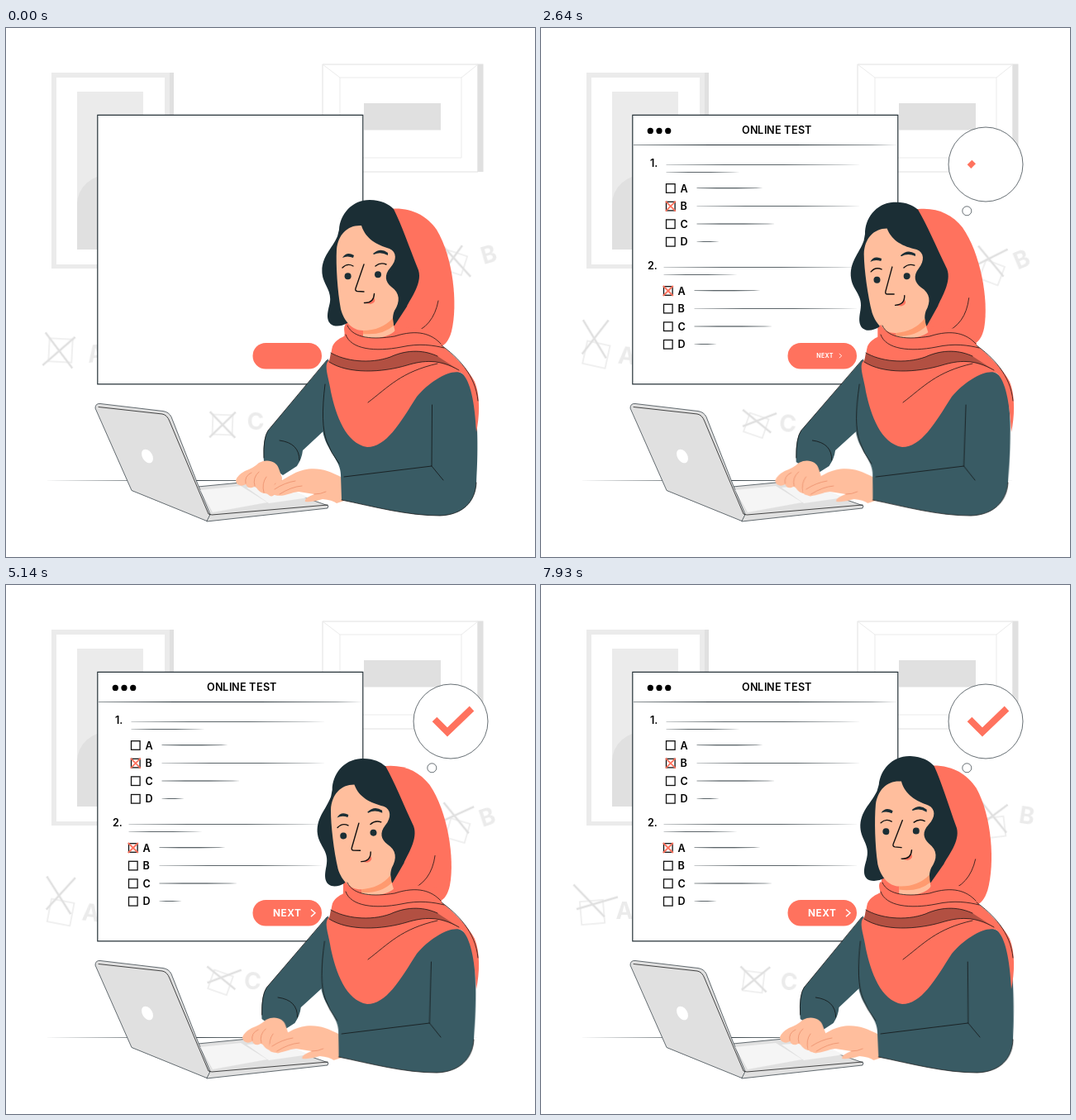
An HTML page that plays this animation: 640x640 px, repeating every 8000 ms.

```html
<!DOCTYPE html>
<html lang="en">
<head>
<meta charset="utf-8">
<title>Online test</title>
<style>
  @property --sway { syntax: '<angle>'; inherits: true; initial-value: 0deg; }

  html, body { margin: 0; width: 100%; height: 100%; overflow: hidden; background: #fff; }
  svg { display: block; width: 100vw; height: 100vh; animation: sway 8s infinite; }
  text, #title { font-family: Inter, "Open Sans", sans-serif; font-weight: 600; font-size: 12.6px; }
  #title { text-align: center; line-height: 18px; letter-spacing: .15px; color: #000; }
  #title span { display: inline-block; }
  #title .gap { margin-left: 3.6px; }
  .pop, .rule, .mark { transform-box: fill-box; transform-origin: center; }
  .rule { transform-origin: left; fill: #263238; }
  .ink { fill: none; stroke: #111; stroke-width: .75; stroke-linecap: round; stroke-linejoin: round; }
  .bold { stroke-width: 1.4; }
  .box { fill: #fff; stroke: #111; stroke-width: 1.3; }
  .mark { fill: none; stroke: #ff725e; stroke-width: 1.8; }
  .skin { fill: #ffbe9d; }
  .crease { fill: none; stroke: #eb8f6b; stroke-width: .8; stroke-linecap: round; }
  .coral { fill: #ff725e; }
  .cloth { fill: #395b64; }
  .hair { fill: #1b2e35; }
  .ghost { fill: none; stroke: #ebebeb; stroke-width: 1.6; }
  .cross { fill: none; stroke: #e0e0e0; stroke-width: 2.3; }
  .label { fill: #ebebeb; font-weight: 700; font-size: 28px; text-anchor: middle; }

  #head { transform-origin: 473px 405px; transform: rotate(var(--sway)); }
  .body { transform-origin: 0 405px; transform: skewX(calc(var(--sway) * .4)); }
  #hand { animation: reach 8s infinite; }
  .drift { animation: drift 8s infinite; }
  #bubble { animation: swell 8s infinite; }
  #dot { animation: dot 8s infinite; }
  #check { stroke-dasharray: 64; animation: tick 8s infinite; }

  @keyframes sway {
    0% { --sway: 0deg; animation-timing-function: cubic-bezier(.3, .3, .6, .95); }
    43% { --sway: -4.4deg; animation-timing-function: cubic-bezier(.4, 0, .7, .8); }
    100% { --sway: 2.1deg; }
  }
  @keyframes reach {
    0% { transform: none; animation-timing-function: ease-in-out; }
    45%, 75% { transform: translateX(11px); }
    100% { transform: translateX(9px); }
  }
  @keyframes drift {
    0% { transform: var(--a); animation-timing-function: cubic-bezier(.3, .3, .6, .95); }
    47% { transform: var(--b); animation-timing-function: cubic-bezier(.4, 0, .7, .8); }
    100% { transform: var(--c); }
  }
  @keyframes swell {
    0%, 8.2% { r: 0; opacity: 0; }
    8.25% { r: 0; opacity: 1; animation-timing-function: cubic-bezier(.2, .6, .5, 1); }
    32.5%, 100% { r: 45px; }
  }
  @keyframes dot {
    0%, 7% { r: 0; opacity: 0; }
    7.05% { r: 0; opacity: 1; animation-timing-function: ease-out; }
    15%, 100% { r: 5.5px; }
  }
  @keyframes tick {
    0%, 31% { stroke-dashoffset: 64; animation-timing-function: ease-in-out; }
    40%, 100% { stroke-dashoffset: 0; }
  }
</style>
</head>
<body>
<svg viewBox="0 0 640 640">
  <!-- wall pictures -->
  <path fill="#e0e0e0" d="M197 54h6v237h-6z"/>
  <path fill="#ebebeb" d="M55 54h143v237H55z"/>
  <path fill="#fff" d="M61 60h131v226H61z"/>
  <path fill="#ebebeb" d="M86 77h80v191H86z"/>
  <path fill="#e0e0e0" d="M86 268v-55a40 36 0 0 1 80 0v55z"/>
  <path fill="#fff" stroke="#e0e0e0" d="M383 44h188v130H383z"/>
  <path fill="#e0e0e0" d="M570.500 43.500h7v130.500h-7zM433 91h93v32.500h-93z"/>
  <path fill="none" stroke="#ebebeb" d="M404 60h147v97H404zM383 44l21 16M571 44l-20 16"/>
  <path class="rule" d="M45 547.500l180-.4 353 .4-200 .6z"/>

  <!-- floating answers -->
  <g transform="translate(66 390)">
    <path class="ghost drift" d="M-14-14h28v28h-28z" style="--a:translate(0,0) rotate(3deg);--b:translate(1px,6px) rotate(14deg);--c:translate(-4px,6px) rotate(-5deg)"/>
    <path class="cross drift" d="M-27 0h54" style="--a:translate(-2px,0) rotate(53deg);--b:translate(-1px,-16px) rotate(60deg);--c:translate(-8px,-8px) rotate(46deg)"/>
    <path class="cross drift" d="M-26 0h52" style="--a:translate(-2px,1px) rotate(-41deg);--b:translate(0,-19px) rotate(-54deg);--c:translate(2px,-5px) rotate(-16deg)"/>
    <g class="drift" style="--a:translate(43px,4px) rotate(-6deg);--b:translate(37px,7px) rotate(7deg);--c:translate(35px,4px) rotate(0deg)"><text class="label" y="10">A</text></g>
  </g>
  <g transform="translate(543 284)">
    <path class="ghost drift" d="M-12-12h24v24h-24z" style="--a:translate(0,0) rotate(18deg);--b:translate(3px,14px) rotate(21deg);--c:translate(6px,9px) rotate(-7deg)"/>
    <path class="cross drift" d="M-24 0h48" style="--a:translate(3px,-1px) rotate(48deg);--b:translate(1px,-2px) rotate(51deg);--c:translate(5px,-3px) rotate(51deg)"/>
    <path class="cross drift" d="M-22 0h44" style="--a:translate(-4px,-3px) rotate(-54deg);--b:translate(3px,-7px) rotate(-22deg);--c:translate(4px,-5px) rotate(-37deg)"/>
    <g class="drift" style="--a:translate(41px,-10px) rotate(-16deg);--b:translate(38px,-3px) rotate(-24deg);--c:translate(45px,-5px) rotate(9deg)"><text class="label" y="10">B</text></g>
  </g>
  <g transform="translate(262 480)">
    <path class="ghost drift" d="M-12-12h24v24h-24z" style="--a:translate(0,0) rotate(2deg);--b:translate(-2px,1px) rotate(22deg);--c:translate(-5px,0) rotate(7deg)"/>
    <path class="cross drift" d="M-22 0h44" style="--a:translate(0,0) rotate(46deg);--b:translate(-1px,-5px) rotate(38deg);--c:translate(-5px,-3px) rotate(45deg)"/>
    <path class="cross drift" d="M-22 0h44" style="--a:translate(0,0) rotate(-44deg);--b:translate(3px,-7px) rotate(-17deg);--c:translate(-2px,-4px) rotate(-39deg)"/>
    <g class="drift" style="--a:translate(40px,-3px) rotate(-4deg);--b:translate(36px,0) rotate(3deg);--c:translate(38px,1px) rotate(4deg)"><text class="label" y="9">C</text></g>
  </g>

  <!-- test window -->
  <path fill="#fff" stroke="#263238" stroke-width="1.2" d="M110.800 105.300h321v325.500h-321z"/>
  <g id="sheet"></g>
  <foreignObject x="185" y="115" width="200" height="20"><div id="title"></div></foreignObject>
  <rect class="coral" x="298.500" y="381" width="83.500" height="31.500" rx="15.750"/>
  <g id="next" class="pop">
    <text x="323" y="400.500" fill="#fff" letter-spacing=".5" style="font-size:11.8px;font-weight:700">NEXT</text>
    <path d="M369 392.500l5 4.300-5 4.300" fill="none" stroke="#fff" stroke-width="1.4"/>
  </g>

  <!-- thought bubble -->
  <g fill="#fff" stroke="#263238" stroke-width=".7">
    <circle id="bubble" cx="538" cy="165" r="45"/>
    <circle id="dot" cx="515.300" cy="221.300" r="5.500"/>
  </g>
  <path id="check" d="M518.500 162.500l15.500 15.500 29.500-28.500" fill="none" stroke="#ff725e" stroke-width="8"/>

  <!-- laptop -->
  <g stroke="#263238" stroke-width=".7" stroke-linejoin="round">
    <path fill="#e0e0e0" d="M232 555l72-7 86 30-1 3-146 16-8-20z"/>
    <path fill="#e0e0e0" d="M108 460q0-6 6-5.500l76 9q7 1 10 7l33 84 14 34-4 8-91-37z"/>
  </g>
  <path fill="#f5f5f5" d="M235 559l49-5 32 20-66 12zM291 556l40-3 36 15-49 7z"/>
  <path class="ink" d="M112 458.500l77 8.500q6 1 9 9l47 112 4 1 140-12"/>
  <ellipse cx="171" cy="518" rx="6" ry="9" fill="#fff" transform="rotate(-32 171 518)"/>

  <!-- far arm -->
  <g class="body">
    <path class="cloth" d="M390 400L317 487Q310 497 312 525L335 541 352 530Q358 521 359 511L388 484z"/>
    <path class="ink" d="M388 402L317 487Q311 496 312 520M331 499Q355 502 355 523"/>
    <g id="hand">
      <path class="skin" d="M311 524C320 522 328 526 330 533L334 544C334 554 330 560 323 566 319 568 317 562 312 563 305 562 304 555 300 555 295 558 291 555 290 552 284 556 278 552 278 547Q280 541 289 536 300 532 306 526z"/>
      <path class="crease" d="M290 551q-2-9 7-13M301 554q-3-10 5-17M312 562q-3-11 3-19M324 564q-2-7 2-13"/>
    </g>
  </g>

  <!-- torso and near arm -->
  <g class="body">
    <path class="skin" d="M407 544C391 536 381 532 366 533.500 351 535 341 544 327 551 320 555 319 563 325 565 336 568 343 562 354 561L373 564Q360 569 362 573 372 574 383 570 395 571 400 575L409 572z"/>
    <path class="crease" d="M325 558q12-8 25-10M331 564q14-9 27-10M373 564q8 0 14-3"/>
    <path class="cloth" d="M388 402C383 440 379 477 385 495 390 512 405 525 405 540L406 571C445 579 485 590 525 590 553 589 568 573 569 550 572 505 570 464 566 440 564 423 550 413 530 412z"/>
    <path class="ink" d="M386 431q-6 48 2 69 5 14 15 27M409 543L515 530 515.500 456M515 530l14 17M406 571C445 579 485 590 525 590 553 589 568 573 569 550"/>
  </g>

  <!-- head -->
  <g id="head">
    <path class="coral" d="M462 219C489 216 508 226 521 244 541 277 547 334 539 367 536 378 531 384 526 385L440 384 409 378 411 350z"/>
    <path class="ink" d="M490 370Q517 362 523 330"/>
    <path class="hair" d="M403 244C404 226 418 208 440 208 454 208 463 213 469 219 479 239 487 263 499 293 504 309 489 328 485 337L470 360 413 357Q404 362 396 360C386 356 389 344 391 336 396 318 384 312 382.500 297 381 277 394 268 401 252z"/>
    <path class="skin" d="M430 239C435 255 448 262 464 267 473 271 473 281 465 290 457 299 459 307 466 313 477 321 477 331 470 342 467 349 468 356 469 360L474 380H432V366C419 366 409 355 405 340 401 318 399 287 400 268 402 249 414 238 430 239z"/>
    <path fill="#ff9a6f" d="M432 366q22 0 36-15l1 9q-13 12-37 10z"/>
    <path class="hair" d="M407 278q5-8 14-3l-1 3q-7-3-13 0zM444 273q9-8 18-1v3q-9-5-17-1z"/>
    <path class="ink bold" d="M407 290q6-6 13-2M447 288q6-5 13-2M433 286l-10 29q-1 3 2 3.500l8 .5"/>
    <circle class="hair" cx="413.600" cy="300.300" r="4"/>
    <circle class="hair" cx="450" cy="298.300" r="4"/>
    <path class="coral" d="M435 333q8-1 10-7 4 6-4 8z"/>
    <path class="ink bold" d="M433.500 332.500Q445 333 445.500 321.500"/>
  </g>

  <!-- scarf -->
  <path class="coral" d="M411 359C418 371 432 376 450 375 466 373 474 365 472 361L526 366 527 384C541 395 560 414 567 428 574 445 573 470 569 489 567 452 562 428 552 418 540 411 514 426 497 446 476 479 460 507 437 507 411 503 399 468 393 440 391 425 385 411 389 404 395 398 392 396 395 385 399 377 405 375 411 372 408 365 409 360 411 359z"/>
  <path fill="#b25042" d="M393 393C410 403 440 407 465 398 487 388 507 390 522 397L548 414C524 400 505 402 485 408 455 417 414 419 391 404z"/>
  <path class="ink" d="M411 371C417 389 447 392 478 386 500 381 518 384 530 387M413 360C420 376 445 377 470 373 498 364 515 370 526 382M393 393C410 403 440 407 465 398 487 388 507 390 522 397M391 404C414 419 455 417 485 408 505 402 524 400 548 414M438 453C463 434 478 416 522 406M527 384C546 398 568 419 571 451"/>
</svg>

<script>
const LOOP = 8000;
const sheet = document.getElementById('sheet');
const title = document.getElementById('title');
const rules = [];

// Adds a looping animation; frames are [ms, css] pairs.
function animate(selector, frames) {
  const name = 'm' + rules.length;
  const all = [[0, frames[0][1]], ...frames, [LOOP, frames.at(-1)[1]]];
  const steps = all.map(([ms, css]) => `${ms / LOOP * 100}%{${css}}`).join('');
  rules.push(`@keyframes ${name}{${steps}}${selector}{animation:${name} ${LOOP}ms linear infinite}`);
}
const grow = (selector, start, length, scale = 'scale') =>
  animate(selector, [
    [start, `transform:${scale}(0);animation-timing-function:ease-out`],
    [start + length, `transform:${scale}(1)`]]);

let count = 0;
function add(markup) {
  const id = 'p' + count++;
  sheet.insertAdjacentHTML('beforeend', markup.replace(/^<(\w+)/, `<$1 id="${id}"`));
  return '#' + id;
}

// Thin pen stroke, fullest near its middle
function line(x, y, width, start, length = 400) {
  const step = width * .3;
  const id = add(`<path class="rule" d="M${x} ${y - .2}l${step}-.25h${step}l${step} .25 ${width * .1} .2-${width * .1} .2-${step} .25h-${step}l-${step}-.25z"/>`);
  grow(id, start, length, 'scaleX');
}
const text = (x, y, string, start) =>
  grow(add(`<text class="pop" x="${x}" y="${y + 4.6}">${string}</text>`), start, 220);

// Window header
for (let i = 0; i < 3; i++)
  grow(add(`<circle class="pop" cx="${132.3 + i * 10.7}" cy="124.400" r="3.600"/>`), 100 + i * 80, 200);
line(112, 141.5, 320, 200, 450);
[...'ONLINETEST'].forEach((letter, i) => {
  title.insertAdjacentHTML('beforeend', `<span id="t${i}"${i === 6 ? ' class="gap"' : ''}>${letter}</span>`);
  grow('#t' + i, 415 + i * 58, 190);
});

// Questions
function question(number, x, y, start) {
  text(x - 19.5, y - 31, number + '.', 420);
  line(x, y - 28.6, 236, start);
  line(x, y - 19.6, 89, start + 50);
  [80, 199, 95, 27].forEach((width, i) => {
    const cy = y + i * 21.6;
    const appear = 860 + i * 110 + (number - 1) * 200;
    grow(add(`<rect class="box pop" x="${x}" y="${cy - 5.3}" width="10.600" height="10.600"/>`), appear, 220);
    text(x + 17, cy, 'ABCD'[i], appear + 50);
    line(x + 37, cy - .2, width, start + 270 + i * 70);
  });
}
question(1, 151.5, 194, 350);
question(2, 148.5, 318, 900);

function mark(x, y, start) {
  animate(add(`<path class="mark" d="M${x - 6} ${y - 6}l12 12M${x + 6} ${y - 6}l-12 12"/>`), [
    [start, 'transform:rotate(20deg) scale(0)'],
    [start + 300, 'transform:rotate(8deg) scale(.7,1)'],
    [start + 650, 'transform:none']]);
}
mark(156.8, 215.6, 1600);
mark(153.8, 318, 1700);

grow('#next', 2450, 450);

document.head.appendChild(document.createElement('style')).textContent = rules.join('\n');
</script>
</body>
</html>
```
